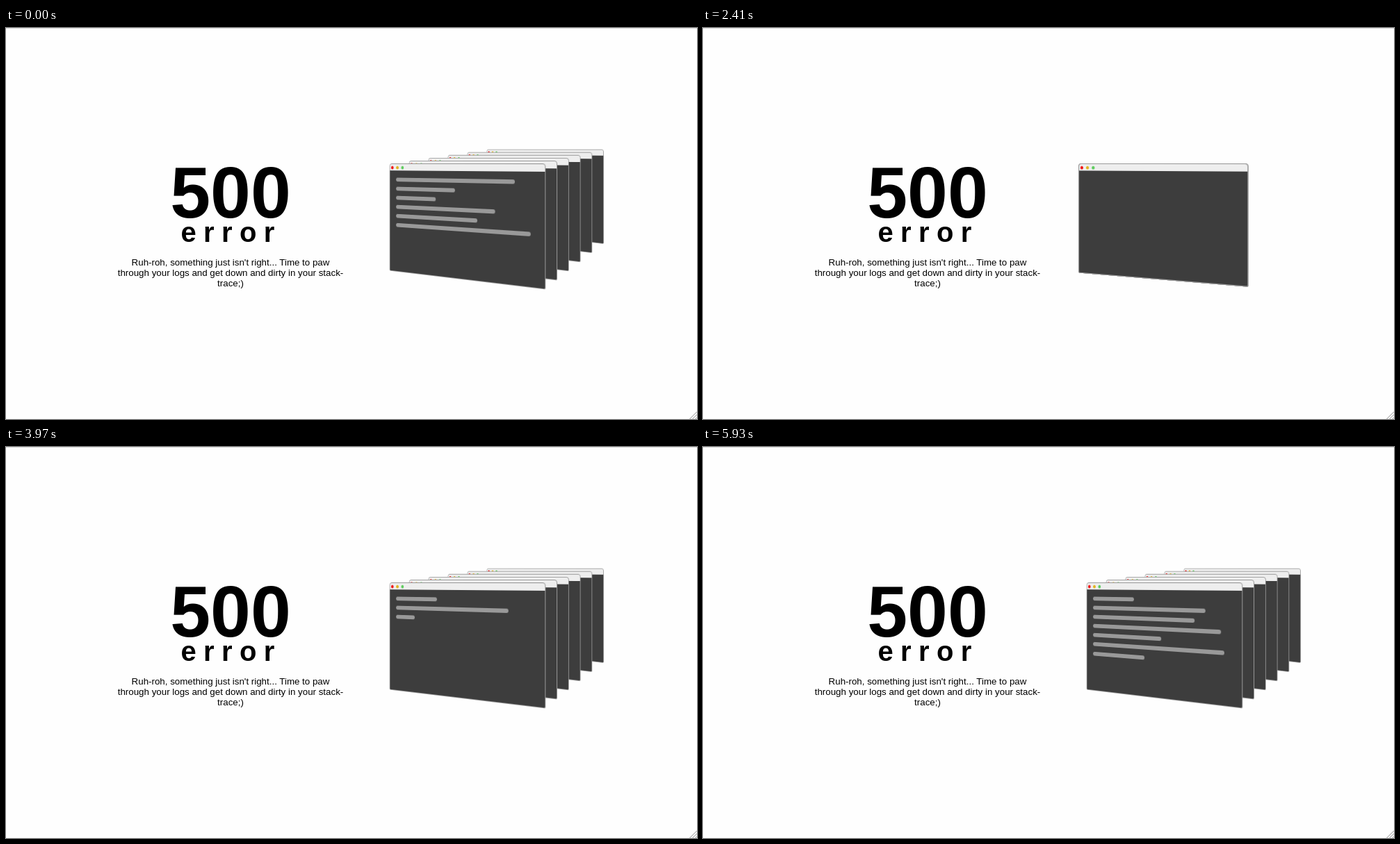
Animation of 994 by 563 pixels, one loop 6.49 s. Source, as an HTML page:

```html
<!DOCTYPE html>
<html lang="en">
<head>
<meta charset="utf-8">
<title>500 error</title>
<style>
html, body { margin: 0; width: 100%; height: 100%; overflow: hidden; background: #fefefe; }
svg { position: absolute; left: 0; top: 0; }
text { font-family: "Liberation Sans", Arial, sans-serif; }
.window {
  position: absolute; left: 522px; top: 195px; width: 266px; height: 167px;
  box-sizing: border-box; border: 1px solid #999; border-radius: 4px 4px 2px 2px;
  background: linear-gradient(#eee 10px, #3d3d3d 0);
  transform-origin: 50% 0;
}
.window::before {
  content: ""; position: absolute; left: 2.1px; top: 2.7px; width: 5px; height: 5px;
  border-radius: 50%; background: #f01414;
  box-shadow: 10px 0 #e2b41e, 20px 0 #5ccc5c;
}
.line { position: absolute; left: 11.8px; height: 6px; border-radius: 3px; background: #999; }
</style>
</head>
<body>
<svg width="994" height="563">
  <path d="M0 .5H994" stroke="#ddd"/>
  <path d="M983.5 563L994 552.5M987.5 563L994 556.5M991.5 563L994 560.5" stroke="#888"/>
</svg>
<div id="page">
  <svg width="994" height="563">
    <g font-weight="bold">
      <text x="323" y="273" font-size="104" text-anchor="middle">500</text>
      <text x="251.4" y="308" font-size="40" letter-spacing="10.4">error</text>
    </g>
    <g font-size="13.33" text-anchor="middle">
      <text x="323" y="342">Ruh-roh, something just isn't right... Time to paw</text>
      <text x="323" y="357">through your logs and get down and dirty in your stack-</text>
      <text x="323" y="372">trace;)</text>
    </g>
  </svg>
</div>
<script>
const LOOP = 6490, BLANK = 1060, RELOAD = 1130;
const TURN = 2150, SPREAD = 2650, MOVE = 600;
const TYPE = 3100, LINE_TIME = 400, CAP = 6;
const oldLines = [207.2, 108.8, 74.9, 176, 147.2, 231, 0];
const newLines = [77.5, 197.5, 180.5, 221.5, 125, 226, 96];

const page = document.getElementById("page");
const add = (parent, name) => {
  const el = parent.appendChild(document.createElement("div"));
  el.className = name;
  return el;
};

// Added back to front, then indexed from the front.
const windows = Array.from({ length: 6 }, () => add(page, "window")).reverse();
const lines = newLines.map((_, i) => {
  const el = add(windows[0], "line");
  el.style.top = 20.9 + 14.1 * i + "px";
  return el;
});

const progress = (t, start, length) => Math.min(1, Math.max(0, (t - start) / length));

// cubic-bezier(.25, .1, .25, 1)
function ease(x) {
  const bezier = (a, b, s) => 3 * a * s * (1 - s) ** 2 + 3 * b * s * s * (1 - s) + s ** 3;
  let low = 0, high = 1;
  for (let i = 0; i < 25; i++) {
    const mid = (low + high) / 2;
    if (bezier(.25, .25, mid) < x) low = mid; else high = mid;
  }
  return bezier(.1, 1, high);
}

// The motion advances in steps of 60 ms.
function hold(t) {
  const from = t < 5450 ? 2170 : 5450;
  return from + Math.floor((t - from) / 60) * 60;
}

function draw(now) {
  const clock = now % LOOP;
  const before = clock < BLANK;
  const t = before ? LOOP : hold(clock);
  const turn = 33 * ease(progress(t, TURN, MOVE));
  const spread = ease(progress(t, SPREAD, MOVE));

  page.style.visibility = before || clock >= RELOAD ? "visible" : "hidden";
  windows.forEach((el, i) => {
    const k = i * spread;
    el.style.transform = `translate(${22.8 * k}px, ${-4.05 * k}px) scale(${1 - .05 * k}) ` +
      `perspective(900px) rotateY(${-turn}deg)`;
  });
  lines.forEach((el, i) => {
    const width = (before ? oldLines : newLines)[i];
    const p = progress(t, TYPE + LINE_TIME * i, LINE_TIME);
    el.style.width = (p && width ? CAP + (width - CAP) * p : 0) + "px";
  });
}

function tick() {
  draw(performance.now());
  requestAnimationFrame(tick);
}
tick();
</script>
</body>
</html>
```
